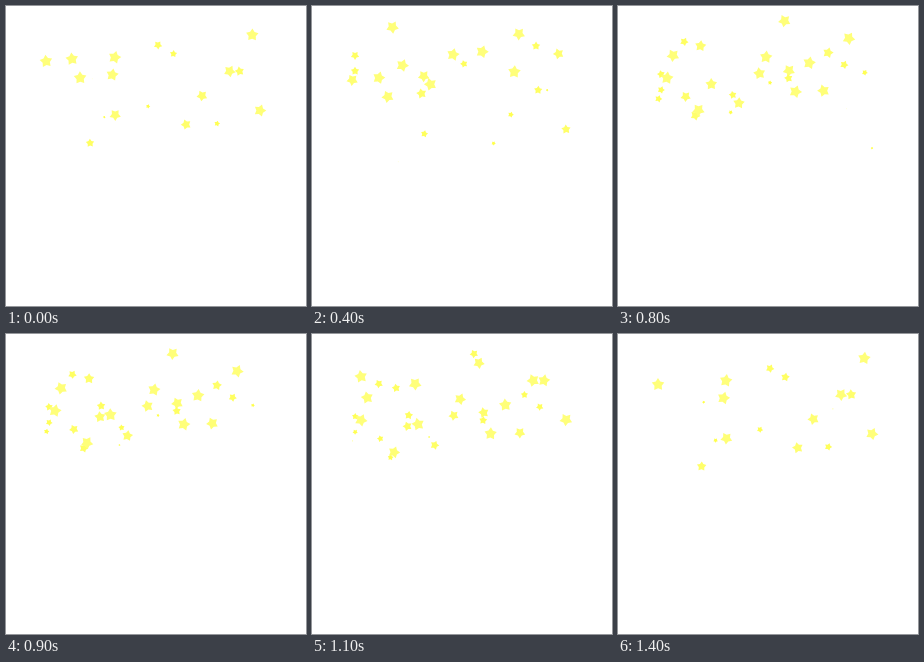
Animation, 300 px wide and 300 px high, one loop 1.5 s. Source, as an HTML page with a canvas:

```html
<!DOCTYPE html>
<html lang="en">
<head>
<meta charset="utf-8">
<title>Falling stars</title>
<style>
  html, body { margin: 0; width: 100%; height: 100%; overflow: hidden; background: #fff; }
  canvas { display: block; width: 300px; height: 300px; }
</style>
</head>
<body>
<canvas id="sky" width="300" height="300"></canvas>
<script>
const LOOP = 1500, STEP = 100;
const EVERY = 40;     // ms between two births
const LIFE = 1400;
const CLEAR = 1200;   // every second star vanishes after this time
const FALL = 0.047;   // px per ms
const ctx = document.getElementById('sky').getContext('2d');

// Birth places in order of birth
const places = [
  [74, 70], [66, 53], [204, 11], [43, 50], [79, 8], [117, 67], [89, 50], [43, 42], [141, 43],
  [170, 42], [202, 64], [224, 40], [166, -2], [148, 36], [79, 91], [170, 61], [230, 23],
  [55, 42], [177, 80], [66, 32], [191, 55], [49, 72], [104, 78], [95, 71], [220, 38],
  [49, 36], [254, 81], [162, 17], [103, 49], [266, 45], [246, 13], [152, 25], [40, 43], [107, 41]
];

// Sideways drift in px per ms, strongest near x = 100 and x = 204
const wind = x => 0.004 * (1 + Math.cos((x - 100) / 104 * 2 * Math.PI));

const stars = places.map(([x, y], i) => ({
  x, y,
  born: (i - 1) * EVERY,
  radius: i % 4 === 3 ? 4.4 : 6.6,
  turn: i * 2.4,
  spin: (i % 2 ? 1 : -1) / 1000,
  brief: i % 2 === 1
}));

function drawStar(x, y, r, turn) {
  ctx.fillStyle = `rgb(255 255 ${Math.round(50 + 11 * r)})`;
  ctx.beginPath();
  for (let i = 0; i < 10; i++) {
    const a = turn + i * Math.PI / 5;
    const d = i % 2 ? r * 0.58 : r;
    ctx.lineTo(x + d * Math.sin(a), y - d * Math.cos(a));
  }
  ctx.fill();
}

function render(time) {
  ctx.clearRect(0, 0, 300, 300);
  for (const s of stars) {
    const age = (time - s.born + LOOP) % LOOP;
    const cleared = s.brief && s.born < CLEAR && s.born + age > CLEAR;
    if (age >= LIFE || cleared) continue;
    const r = s.radius * (1 - (age / LIFE) ** 3);
    drawStar(s.x + wind(s.x) * age, s.y + FALL * age, r, s.turn + s.spin * age);
  }
}

function tick() {
  render(Math.floor(performance.now() % LOOP / STEP) * STEP);
  requestAnimationFrame(tick);
}
tick();
</script>
</body>
</html>
```
